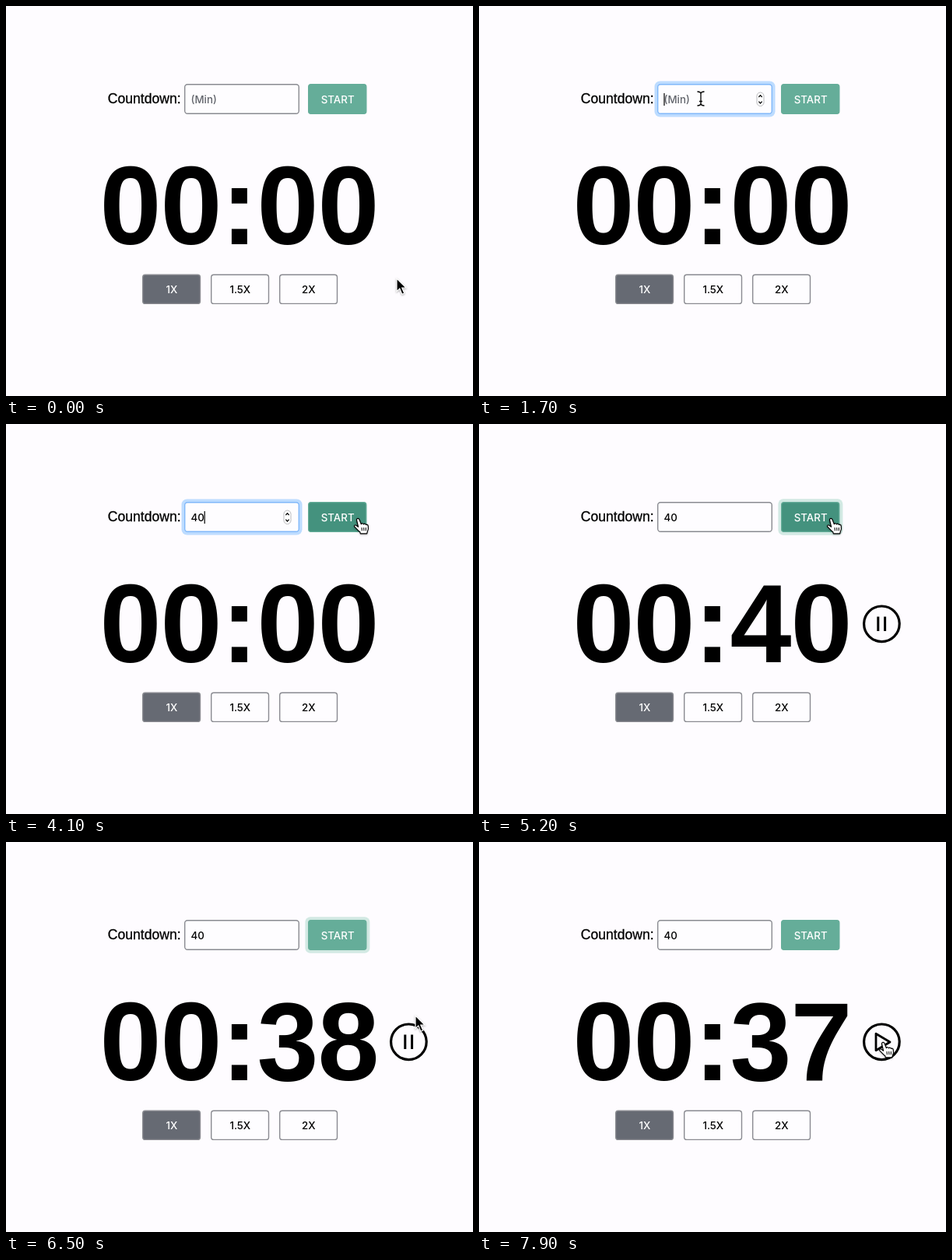
These frames come from a looping animation (600x501 px, 8 s). An HTML page:

```html
<!DOCTYPE html>
<html lang="en">
<head>
<meta charset="utf-8">
<title>Countdown</title>
<style>
  html, body { margin: 0; width: 100%; height: 100%; overflow: hidden; background: #fefcff; }
  svg { display: block; width: 600px; height: 501px; }
  text { font: 500 13.3px Inter, Roboto, sans-serif; }
  .mid { text-anchor: middle; }
  #label { font: 17.6px "Liberation Sans", Arial, sans-serif; stroke: #000; stroke-width: .3px; }
  #clock { font: bold 142px "Liberation Sans", Arial, sans-serif; letter-spacing: -1.1px; }
  .line { fill: none; stroke: #000; }
</style>
</head>
<body>
<svg viewBox="0 0 600 501">
  <rect width="600" height="501" fill="#fefcff"/>

  <text id="label" x="130.8" y="125">Countdown:</text>

  <rect id="inputRing" x="225.5" y="96.5" width="155" height="46" rx="7" fill="#bddcff"/>
  <rect id="input" x="229.7" y="100.7" width="146.6" height="37.6" rx="3.5" fill="#fefdff" stroke-width="1.4"/>
  <text id="value" x="237.5" y="125.2"></text>
  <rect id="caret" x="254.4" y="112" width="1.2" height="16"/>
  <g id="spinner">
    <rect x="357" y="111" width="9" height="17.5" rx="4.5" fill="#fff" stroke="#b9b9bd"/>
    <path class="line" d="M359.4 117l2.1-2.4 2.1 2.4M359.4 122.6l2.1 2.4 2.1-2.4" stroke-width="1.2"/>
  </g>

  <rect id="startRing" x="384.4" y="96.3" width="83" height="46.4" rx="6.5" fill="#d2e9e3"/>
  <rect id="start" x="388.6" y="100.6" width="74.3" height="37.8" rx="3.2" stroke="#65ad99" stroke-width="1.2"/>
  <text class="mid" x="426.2" y="125.2" fill="#fff">START</text>

  <text id="clock" x="120.6" y="306"></text>
  <g id="speeds"></g>

  <g id="toggle" class="line" stroke-linejoin="round">
    <circle cx="517.4" cy="256.8" r="22.8" stroke-width="3.2"/>
    <path id="pause" d="M512.8 247.5v18.5M521.6 247.5v18.5" stroke-width="3"/>
    <path id="play" d="M510 246.3v21.4l18-10.7z" stroke-width="2.8"/>
  </g>

  <g id="cursor">
    <path id="arrow" d="M0 0v16.6l3.8-3.6 3 7.3 3-1.3-3-7h5.2z" stroke="#fff" stroke-width="1.2"
          style="filter:drop-shadow(0 1.2px 1px #0005)"/>
    <g id="beam" class="line">
      <path d="M-4.5-9q4 0 4.5 2.5q.5-2.5 4.5-2.5M0-7V7M-4.5 9q4 0 4.5-2.5q.5 2.5 4.5 2.5M-2 3.5h4" stroke-width="1.3"/>
    </g>
    <g id="hand" stroke="#000" stroke-width="1.2" stroke-linejoin="round"
       style="filter:drop-shadow(0 1px 1px #0004)">
      <path fill="#fff" d="M-1.5 1.5C-1.8-.8 1.2-1.4 2 .8L4.3 6.6C5 5.4 6.8 5.4 7.4 6.8 8.4 5.8 10 6.2 10.4 7.4
        11.6 6.8 13 7.4 13.3 9 13.8 12 13.4 14.5 12.3 16.3L11.7 18.8H3.4L2.8 16.8C.5 15-2 12-4.2 10-5.2 8.4-3.5 7.2-2 8.2L.6 10.2Z"/>
      <path fill="none" d="M5 11l.3 4.2M7.7 11l.2 4.2M10.3 11v4.2" stroke-width="1"/>
    </g>
  </g>
</svg>
<script>
const LOOP = 8000, STEP = 100, FADE = 150;
const $ = id => document.getElementById(id);
const clamp = v => Math.max(0, Math.min(1, v));

const FOCUS = 1500, TYPE = [2300, 2700], PRESS = 4250, RUN = 4300, STOP = 7600;
const HIDDEN = [2300, 3300];

// time, x, y of the pointer's hot spot
const PATH = [
  [0, 502, 350], [300, 502, 350], [500, 465, 362], [600, 420, 368], [700, 374, 370],
  [800, 334, 366], [900, 323, 341], [1000, 321, 299], [1200, 308, 190], [1400, 288, 124],
  [1500, 285, 119], [3300, 285, 119], [3600, 352, 119], [3800, 410, 122], [4000, 452, 122],
  [5900, 452, 122], [6100, 472, 150], [6300, 503, 197], [6500, 526, 223], [6700, 525, 246],
  [6900, 519, 258], [LOOP, 519, 258]
];

const SPEEDS = [
  { name: '1X', x: 175, on: -FADE, off: LOOP },
  { name: '1.5X', x: 263, on: 760, off: 880 },
  { name: '2X', x: 351, on: 590, off: 720 }
];

// 0..1 level of a state that eases in at `on` and out at `off`
const level = (t, on, off) => Math.min(clamp((t - on) / FADE), 1 - clamp((t - off) / FADE));

const mix = (a, b, k) => `rgb(${a.map((v, i) => Math.round(v + (b[i] - v) * k))})`;
const show = (el, on) => { el.style.display = on ? '' : 'none'; };

function pointerAt(t) {
  const i = PATH.findIndex(p => p[0] > t);
  const [t0, x0, y0] = PATH[i - 1], [t1, x1, y1] = PATH[i];
  const k = (t - t0) / (t1 - t0);
  return [x0 + (x1 - x0) * k, y0 + (y1 - y0) * k];
}

function pointerKind(x, y, t) {
  const inside = (l, r, top, bottom) => x >= l && x <= r && y >= top && y <= bottom;
  if (inside(388, 463, 100, 139)) return 'hand';
  if (SPEEDS.some(s => inside(s.x, s.x + 75, 345, 383))) return 'hand';
  if (t > RUN && Math.hypot(x - 517.4, y - 256.8) < 24) return 'hand';
  if (inside(229, 377, 100, 139) || inside(120, 480, 175, 335)) return 'beam';
  return 'arrow';
}

$('speeds').innerHTML = SPEEDS.map(s => `
  <rect x="${s.x + .7}" y="345.2" width="73.8" height="37.2" rx="3.2" stroke="#8a8b91" stroke-width="1.4"/>
  <text class="mid" x="${s.x + 37.8}" y="369.4">${s.name}</text>`).join('');
const boxes = [...$('speeds').querySelectorAll('rect')];
const names = [...$('speeds').querySelectorAll('text')];

function draw(t) {
  const focused = t >= FOCUS && t < PRESS;
  const typed = TYPE.filter(at => t >= at).length;
  const focus = level(t, FOCUS, PRESS);

  $('inputRing').style.opacity = focus;
  $('input').style.stroke = mix([138, 139, 145], [128, 184, 250], focus);
  $('value').textContent = typed ? '40'.slice(0, typed) : '(Min)';
  $('value').style.fill = typed ? '#000' : '#62656c';
  const lastEdit = typed ? TYPE[typed - 1] : FOCUS;
  show($('caret'), focused && Math.floor((t - lastEdit) / 500) % 2 === 0);
  $('caret').setAttribute('x', 237.4 + typed * 8.6);
  show($('spinner'), t >= 1400 && t < PRESS);

  $('startRing').style.opacity = level(t, PRESS, STOP);
  $('start').style.fill = mix([101, 173, 153], [68, 146, 126], level(t, 3750, 6050));

  const left = t < RUN ? 0 : 40 - Math.floor((Math.min(t, STOP) - RUN) / 1000);
  $('clock').textContent = '00:' + String(left).padStart(2, '0');
  show($('toggle'), t >= RUN);
  show($('pause'), t < STOP);
  show($('play'), t >= STOP);

  SPEEDS.forEach((s, i) => {
    const k = level(t, s.on, s.off);
    boxes[i].style.fill = mix([254, 253, 255], [102, 106, 115], k);
    names[i].style.fill = mix([0, 0, 0], [255, 255, 255], k);
  });

  const [x, y] = pointerAt(t);
  const kind = pointerKind(x, y, t);
  $('cursor').setAttribute('transform', `translate(${x} ${y})`);
  show($('cursor'), t < HIDDEN[0] || t >= HIDDEN[1]);
  for (const id of ['arrow', 'beam', 'hand']) show($(id), id === kind);
}

const begin = performance.now();
function tick() {
  const t = (performance.now() - begin) % LOOP;
  draw(Math.floor(t / STEP) * STEP);
  requestAnimationFrame(tick);
}
tick();
</script>
</body>
</html>
```
